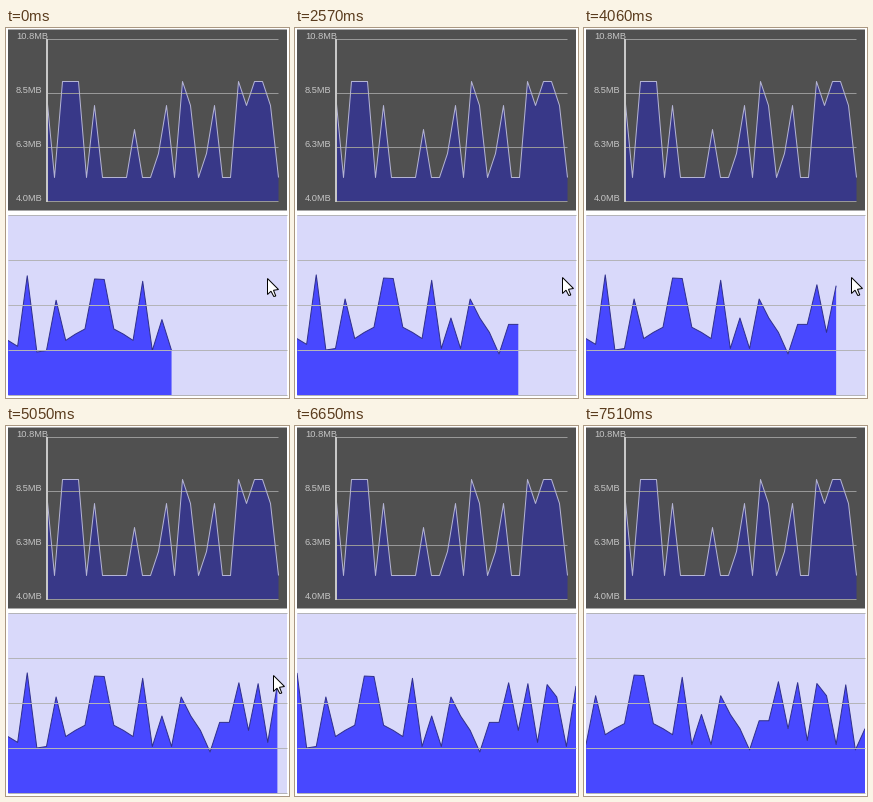
Write a matplotlib script that moves like this. It is 283 px wide and 370 px high and loops after 8 s.

```python
import matplotlib.pyplot as plt
import numpy as np
from matplotlib.animation import FuncAnimation
from matplotlib.patches import Polygon, Rectangle

W, H, DPI = 283, 370, 100
LOOP, STEP = 8000, 20
PX = 72 / DPI  # one pixel in points

LEFT, RIGHT, TOP, BOTTOM = 2, 281, 187, 367  # live chart
START, SLOTS, TOTAL = 18, 30, 34             # samples at first, in view, in all
FIRST, EVERY = 100, 490                      # when new samples arrive
DIPS = (21, 32)                              # new lows, each rescales the axis

# Pointer tip: (time, position)
POINTER = [(0, (261, 250)), (120, (264, 250)), (560, (267, 249)),
           (6350, (255, 293)), (6500, (254, 359)), (6650, None)]
ARROW = np.array([(0, 0), (0, 16), (3.5, 12.7), (6.3, 18), (8.3, 17.5),
                  (6, 11.8), (11, 11)]) + 0.5

fig = plt.figure(figsize=(W / DPI, H / DPI), dpi=DPI, facecolor="white")
ax = fig.add_axes([0, 0, 1, 1])
ax.set_xlim(0, W)
ax.set_ylim(H, 0)
ax.axis("off")


def with_spikes(base, spikes):
    """Copy of base with the samples at the given places set to a level."""
    values = np.array(base, dtype=float)
    for level, places in spikes:
        values[list(places)] = level
    return values


def memory_series():
    # levels run from 0 (plateau) to 4 (floor)
    return with_spikes(np.full(30, 4), [
        (0, (2, 3, 4, 17, 24, 26, 27)), (0.5, (0,)),
        (1, (6, 15, 18, 21, 25, 28)), (2, (11,)), (3, (14, 20))])


def live_series():
    # a slow swell with spikes of three sizes, the tall ones fading a little
    i = np.arange(TOTAL)
    swell = 309 - 13 * np.cos(2 * np.pi * (i - 9.5) / 13)
    tall = np.array([2, 9, 10, 14, 24, 26, 28, 31])
    return with_spikes(swell, [
        (246 + 0.45 * tall, tall), (271, (5, 18, 29)),
        (290, (16, 19)), (326, DIPS)])


def panel(x0, y0, x1, y1, color):
    return ax.add_patch(Rectangle((x0, y0), x1 - x0, y1 - y0,
                                  fc=color, lw=0, snap=False))


def rule(xs, ys, color, width=1, z=4):
    ax.plot(xs, ys, color=color, lw=width * PX, zorder=z,
            solid_capstyle="butt")


def area(color):
    return ax.add_patch(Polygon([(0, 0)] * 3, fc=color, lw=0, zorder=2))


def fill_under(patch, x, y, base):
    patch.set_xy([(x[0], base), *zip(x, y), (x[-1], base)])


def draw_memory():
    panel(2, 1.5, 281, 182.5, "#505050")
    levels = memory_series()
    x = np.linspace(40.5, 272.5, len(levels))
    y = 53.5 + 24 * levels
    fill_under(area("#383888"), x, y, 173)
    for row, label in zip(range(11, 174, 54),
                          ("10.8MB", "8.5MB", "6.3MB", "4.0MB")):
        rule([41, 272], [row, row], "#989898", z=3)
        ax.text(10, row, label, color="#c4c4c4", size=9.3 * PX,
                family="Liberation Sans", va="baseline", zorder=6)
    rule(x, y, "#b4b4d4")
    rule([41, 41], [11, 174], "#c8c8c8", width=2, z=5)


draw_memory()
live = live_series()
live_panel = panel(LEFT, TOP, RIGHT, BOTTOM + 1, "#d9d9fa")
live_area = area("#4848ff")
live_line, = ax.plot([], [], color="#30308c", lw=PX, zorder=3,
                     solid_capstyle="butt")
for artist in (live_area, live_line):
    artist.set_clip_path(live_panel)
for row in range(TOP, BOTTOM + 1, 45):
    rule([LEFT, RIGHT], [row, row], "#b4b4b8")
pointer = ax.add_patch(Polygon(ARROW, fc="white", ec="black", lw=PX,
                               joinstyle="miter", zorder=8))


def update(frame):
    t = frame * STEP + STEP / 2
    count = min(TOTAL, START + 1 + int((t - FIRST) // EVERY))
    first = max(0, count - SLOTS)
    scale = 1.015 - 0.015 * sum(dip < count for dip in DIPS)
    y = TOP + (live[first:count] - TOP) * scale
    x = LEFT + np.arange(count - first) * (RIGHT - LEFT) / (SLOTS - 1)
    fill_under(live_area, x, y, BOTTOM)
    live_line.set_data(x, y)

    tip = [place for start, place in POINTER if start <= t][-1]
    pointer.set_visible(tip is not None)
    if tip:
        pointer.set_xy(ARROW + tip)
    return live_area, live_line, pointer


anim = FuncAnimation(fig, update, frames=LOOP // STEP, interval=STEP,
                     repeat=True, repeat_delay=0, blit=False)
plt.show()
```
